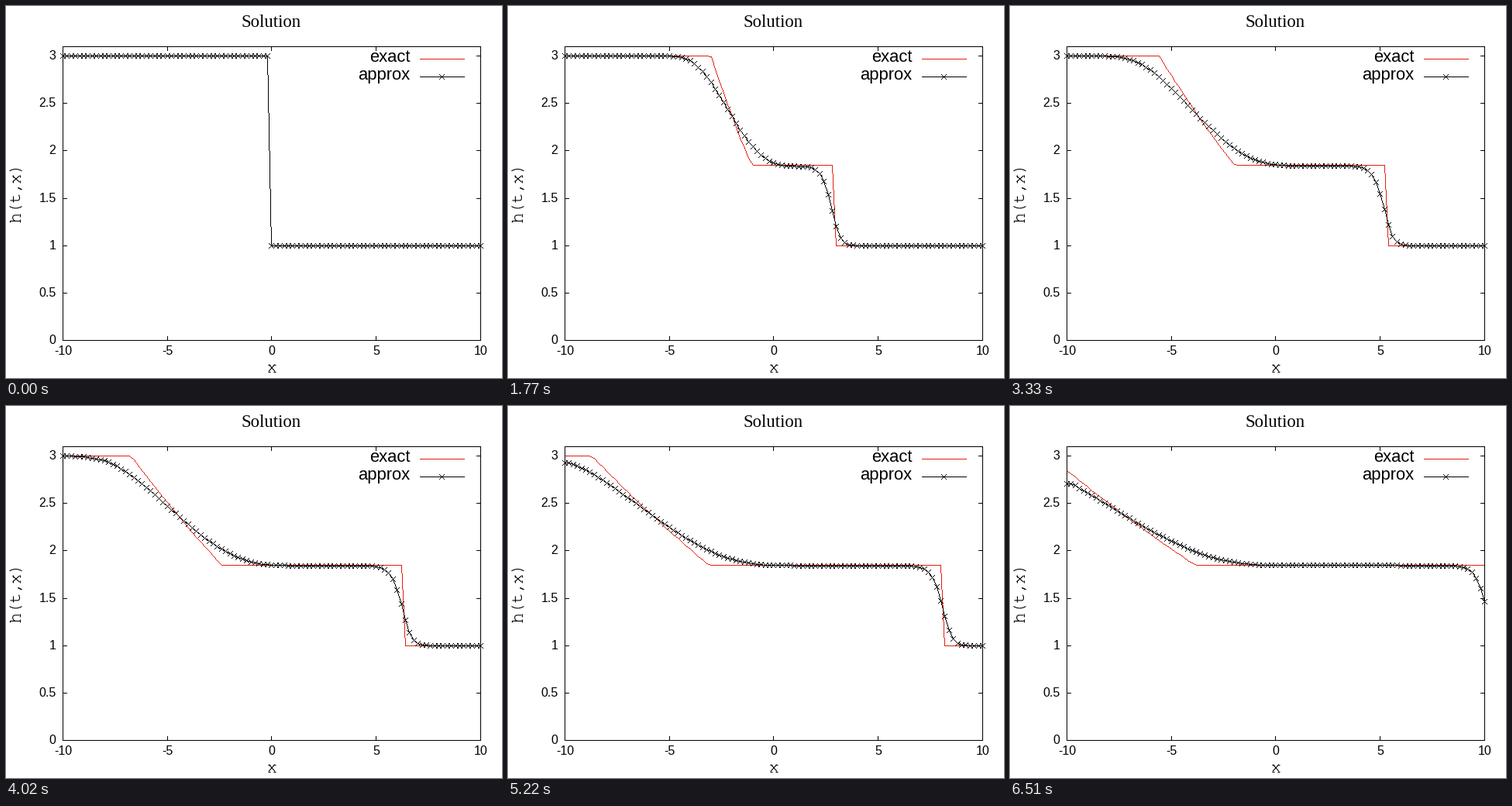
Recreate the animation shown at these times as a matplotlib script. Size 640 by 480 pixels, loop 6.54 s.

```python
import numpy as np
import matplotlib.pyplot as plt
from matplotlib.animation import FuncAnimation

W, H, DPI = 640, 480, 80
LEFT, RIGHT, TOP, BOTTOM = 73, 612, 52, 431
FRAMES, INTERVAL = 218, 30
BLACK, RED = (0, 0, 0), (229, 30, 16)

# Dam break for the shallow water equations, g = 1
DX, CFL = 0.2, 0.3
H_L, H_R = 3.0, 1.0
POINTS = 101
x_all = (np.arange(POINTS + 1) - 50) * DX      # last cell is a hidden ghost
x = x_all[:POINTS]


def dam(pos):
    return np.where(pos < 0, H_L, H_R)


def middle_state():
    """Depth and speed between the rarefaction and the shock."""
    lo, hi = H_R, H_L
    for _ in range(60):
        h = (lo + hi) / 2
        u = 2 * (np.sqrt(H_L) - np.sqrt(h))
        if u > (h - H_R) * np.sqrt((h + H_R) / (2 * h * H_R)):
            lo = h
        else:
            hi = h
    return h, u


H_M, U_M = middle_state()
SHOCK = H_M * U_M / (H_M - H_R)


def exact(t):
    if t == 0:
        return dam(x)
    xi = x / t
    fan = ((2 * np.sqrt(H_L) - xi) / 3) ** 2
    wave = np.where(xi < U_M - np.sqrt(H_M), fan, H_M)
    wave = np.where(xi < -np.sqrt(H_L), H_L, wave)
    return np.where(xi < SHOCK, wave, H_R)


def step(h, q):
    """One Rusanov step with an adaptive time step."""
    u = q / h
    speed = np.abs(u) + np.sqrt(h)
    dt = CFL * DX / speed.max()
    a = np.maximum(speed[:-1], speed[1:])

    def advance(v, f):
        flux = (f[:-1] + f[1:]) / 2 - a * (v[1:] - v[:-1]) / 2
        new = v.copy()
        new[1:-1] -= dt / DX * (flux[1:] - flux[:-1])
        new[0], new[-1] = new[1], new[-2]
        return new

    return advance(h, q), advance(q, q * u + h * h / 2), dt


def simulate():
    h, q, t = dam(x_all), np.zeros(POINTS + 1), 0.0
    states = []
    for _ in range(FRAMES):
        states.append((t, h[:POINTS]))
        h, q, dt = step(h, q)
        t += dt
    return states


states = simulate()


# Crisp one-pixel drawing
def px(v):
    return np.rint(LEFT + (np.asarray(v) + 10) * (RIGHT - LEFT) / 20).astype(int)


def py(v):
    return np.rint(BOTTOM - np.asarray(v) * (BOTTOM - TOP) / 3.1).astype(int)


def line(img, x0, y0, x1, y1, color):
    n = max(abs(x1 - x0), abs(y1 - y0), 1)
    k = np.arange(n + 1) / n
    cols = np.floor(x0 + (x1 - x0) * k + 0.5).astype(int)
    rows = np.floor(y0 + (y1 - y0) * k + 0.5).astype(int)
    img[rows, cols] = color


def polyline(img, xs, ys, color):
    for i in range(len(xs) - 1):
        line(img, xs[i], ys[i], xs[i + 1], ys[i + 1], color)


def cross(img, cx, cy):
    d = np.arange(-3, 4)
    img[cy + d, cx + d] = BLACK
    img[cy - d, cx + d] = BLACK


def backdrop():
    img = np.full((H, W, 3), 255, np.uint8)
    polyline(img, [LEFT, RIGHT, RIGHT, LEFT, LEFT],
             [TOP, TOP, BOTTOM, BOTTOM, TOP], BLACK)
    for cx in px([-5, 0, 5]):
        line(img, cx, TOP, cx, TOP + 5, BLACK)
        line(img, cx, BOTTOM, cx, BOTTOM - 5, BLACK)
    for cy in py(np.arange(0, 3.1, 0.5)):
        line(img, LEFT, cy, LEFT + 5, cy, BLACK)
        line(img, RIGHT, cy, RIGHT - 5, cy, BLACK)
    line(img, 534, 68, 591, 68, RED)
    line(img, 534, 91, 591, 91, BLACK)
    cross(img, 562, 91)
    return img


base = backdrop()
cols = px(x)


def render(i):
    t, h = states[i]
    img = base.copy()
    polyline(img, cols, py(exact(t)), RED)
    rows = py(h)
    polyline(img, cols, rows, BLACK)
    for cx, cy in zip(cols, rows):
        cross(img, cx, cy)
    img[TOP:BOTTOM + 1, [LEFT, RIGHT]] = BLACK
    return img


fig = plt.figure(figsize=(W / DPI, H / DPI), dpi=DPI, facecolor="white")
ax = fig.add_axes([0, 0, 1, 1])
ax.axis("off")
picture = ax.imshow(base, extent=(0, W, H, 0), interpolation="nearest", aspect="auto")
ax.set_xlim(0, W)
ax.set_ylim(H, 0)


def label(cx, cy, text, size, align="center", family="Liberation Sans"):
    ax.text(cx, cy, text, fontsize=size * 72 / DPI, family=family,
            ha=align, va="baseline", color="black")


label(342.5, 27, "Solution", 22.7, family="Liberation Serif")
label(521.5, 72.5, "exact", 22, "right")
label(521.5, 95.5, "approx", 22, "right")
for v in range(-10, 11, 5):
    label(px(v) + 0.8, 450, str(v), 16)
for v in np.arange(0, 3.1, 0.5):
    label(64.5, py(v) + 5, f"{v:g}", 16, "right")


# Slab typewriter letters for the axis names, drawn as thin strokes
def bend(p0, p1, p2):
    k = np.linspace(0, 1, 13)[:, None]
    curve = (1 - k) ** 2 * np.array(p0) + 2 * k * (1 - k) * np.array(p1) + k ** 2 * np.array(p2)
    return [tuple(p) for p in curve]


GLYPHS = {
    "h": [[(-5.4, 12.6), (-3.6, 12.6), (-3.6, 0)],
          [(-5.4, 0), (-1.8, 0)],
          bend((-3.6, 6), (-2.4, 8.8), (0.4, 8.8)) + bend((0.4, 8.8), (3.6, 8.8), (3.6, 5.4)) + [(3.6, 0)],
          [(1.8, 0), (5.4, 0)]],
    "(": [bend((2.4, 13), (-2.4, 5), (2.4, -3))],
    "t": [[(-2.6, 12)] + bend((-2.6, 2.6), (-2.6, 0), (0.6, 0)) + bend((0.6, 0), (2.8, 0), (4.6, 1.1)),
          [(-4.8, 8.8), (3.6, 8.8)]],
    ",": [[(0.9, 2), (-1.2, -3)], [(1.4, 2), (-1.2, -3)]],
    "x": [[(-4.1, 0), (3.8, 8.9)], [(4.1, 0), (-3.8, 8.9)],
          [(-5.2, 0), (-1.9, 0)], [(1.9, 0), (5.2, 0)],
          [(-4.9, 8.9), (-1.8, 8.9)], [(1.8, 8.9), (4.9, 8.9)]],
    ")": [bend((-2.4, 13), (2.4, 5), (-2.4, -3))],
}


def typewriter(text, cx, cy, upright=True, advance=12.6):
    start = -(len(text) - 1) / 2 * advance
    for i, ch in enumerate(text):
        for stroke in GLYPHS[ch]:
            u, v = np.array(stroke).T
            u = u + start + i * advance
            xs, ys = (cx + u, cy - v) if upright else (cx - v, cy - u)
            ax.plot(xs, ys, color="black", lw=1.1 * 72 / DPI, solid_capstyle="butt")


typewriter("x", 343, 471.5)
typewriter("h(t,x)", 17.5, 242, upright=False)


def update(i):
    picture.set_data(render(i))
    return picture,


anim = FuncAnimation(fig, update, frames=FRAMES, interval=INTERVAL,
                     repeat=True, repeat_delay=0, blit=False)
plt.show()
```
